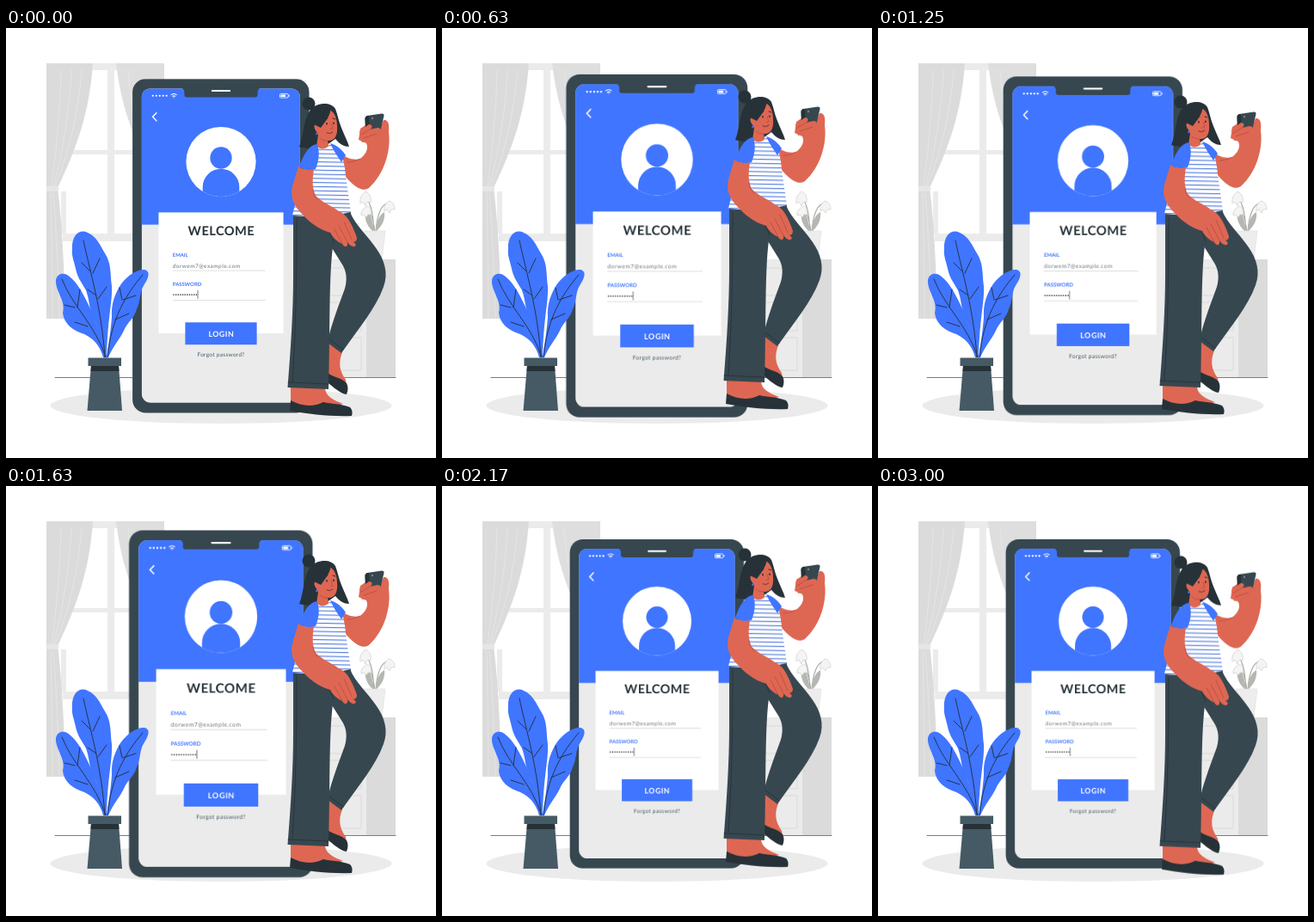
Animation, 500 px wide and 500 px high, one loop 3040 ms. Source, as an HTML page:

```html
<!DOCTYPE html>
<html lang="en">
<head>
<meta charset="utf-8">
<title>Login illustration</title>
<style>
html, body { margin: 0; width: 100%; height: 100%; overflow: hidden; background: #fff; }
svg { display: block; width: 100vw; height: 100vh; }
text { font-family: Lato, "Open Sans", sans-serif; text-rendering: geometricPrecision; }
.bold { font-weight: 700; }
.blue { fill: #4075ff; }
.dark { fill: #37474f; }
.ink { fill: #263238; }
.skin { fill: #de6753; }
.line { fill: none; stroke-linecap: round; stroke-linejoin: round; }
.vein { stroke: #24344c; stroke-width: 1; }
.crease { stroke: #b94d3f; stroke-width: .8; }
.seam { stroke: #222f36; stroke-width: .7; }

#phone { transform-origin: 250px 253px; animation: beat 3040ms linear infinite; }
#woman { animation: float 3040ms linear infinite; }

@keyframes beat {
  0%     { transform: scale(1.0145); }
  8.7%   { transform: scale(1.1); }
  29.6%  { transform: scale(1); }
  38.3%  { transform: scale(1); }
  48%    { transform: scale(1.1); }
  60.5%  { transform: scale(1); }
  98.68% { transform: scale(1); }
  100%   { transform: scale(1.0145); }
}
@keyframes float {
  0%    { transform: translateY(0); }
  23.5% { transform: translateY(-9px); }
  48.5% { transform: translateY(1px); }
  73.5% { transform: translateY(-9px); }
  98.2% { transform: translateY(1px); }
  100%  { transform: translateY(0); }
}
</style>
</head>
<body>
<svg viewBox="0 0 500 500">
  <defs>
    <clipPath id="screen"><rect x="159" y="73" width="181.5" height="360" rx="10"/></clipPath>
    <clipPath id="disc"><circle cx="250" cy="157" r="40"/></clipPath>
    <pattern id="stripes" width="80" height="4.8" y="142" patternUnits="userSpaceOnUse" patternTransform="rotate(1)">
      <rect width="80" height="4.8" fill="#fff"/>
      <rect y="2" width="80" height="1.1" fill="#4b76df"/>
    </pattern>
  </defs>

  <!-- window and curtains -->
  <g>
    <path fill="#ebebeb" d="M66 239H184V248H66Z M118 49H126V239H118Z M68 142H184V147H68Z M64 190H70V239H64Z M90 41H140V49H90Z"/>
    <path fill="#dedede" d="M128 41C132 76 140 104 152 132L176 187H184V41Z"/>
    <path fill="#dbdbdb" d="M47 41H101C97 98 83 138 60 186C65 224 68 280 69 338H47Z"/>
    <path class="line" stroke="#e8e8e8" stroke-width=".8" d="M88 49C84 100 73 145 57 185 M76 49C74 95 66 145 55 185 M64 49C63 100 58 145 53 185 M55 192C59 240 61 290 62 338 M52 192C53 240 54 290 54 338 M142 49C144 75 147 100 152 120"/>
    <rect x="47" y="184" width="14" height="6" rx="2" fill="#e6e6e6"/>
  </g>

  <!-- cabinet and flowers -->
  <g>
    <path fill="#ebebeb" d="M330 269H419V406H330Z"/>
    <path fill="#dbdbdb" d="M419 269H453V406H419Z"/>
    <path class="line" stroke="#dadada" d="M340 279H413V311H340Z M340 319H413V352H340Z M340 360H413V398H340Z"/>
    <path class="line" stroke="#a9ada6" stroke-width="1.2" d="M428 238C427 218 425 203 417 196 M430 238C431 219 436 203 446 204 M429 238C427 219 422 211 418 211"/>
    <path fill="#b5b8b2" d="M427 237C418 229 415 217 420 210C424 218 427 226 428 237Z M430 237C430 226 434 217 440 214C441 222 438 230 430 237Z"/>
    <path fill="#f4f4f4" stroke="#cfd1cc" stroke-width=".7" d="M418 190C413 194 411 198 412 204L415 202L418 207L420 202L424 203C425 197 423 192 418 190Z M445 201C441 204 439 208 440 213L443 211L446 215L448 211L452 211C452 206 450 202 445 201Z M420 207C415 210 412 214 413 218L416 217L419 220L421 217L424 217C425 212 424 208 420 207Z"/>
    <path fill="#ededed" stroke="#dcdcdc" stroke-width=".6" d="M416 236H441L437 269H421Z"/>
  </g>

  <path class="line" stroke="#4d6355" stroke-width=".8" d="M57 406.5H453"/>
  <ellipse cx="250" cy="439" rx="198.5" ry="21" fill="#ebebeb"/>

  <g id="phone">
    <rect class="dark" x="148.6" y="62" width="202.4" height="382.6" rx="15"/>
    <g clip-path="url(#screen)">
      <rect x="159" y="73" width="182" height="361" fill="#ebebeb"/>
      <rect class="blue" x="159" y="73" width="182" height="156"/>
    </g>
    <path class="dark" d="M203 72Q208 73 208 77V80Q208 83 211 83H289Q292 83 292 80V77Q292 73 297 72Z"/>
    <path class="line" stroke="#fff" stroke-width="2" d="M240 75.7H260"/>
    <path class="line" stroke="#fff" stroke-width="2.2" stroke-dasharray="0 3.9" d="M172 81.3H188"/>
    <path class="line" stroke="#fff" d="M193 80.2Q196 77.8 199 80.2 M194.5 82Q196 80.8 197.5 82 M196 83.3V83.4"/>
    <rect x="317.5" y="79" width="9.5" height="4.6" rx="1" fill="none" stroke="#fff" stroke-width=".8"/>
    <path fill="#fff" d="M318.5 80H324V82.6H318.5Z M327.4 80.3H328.4V82.3H327.4Z"/>
    <path class="line" stroke="#fff" stroke-width="1.4" d="M176 101L171.7 105.5L176 110"/>

    <circle cx="250" cy="157" r="40" fill="#fff"/>
    <g class="blue" clip-path="url(#disc)">
      <circle cx="250" cy="152.5" r="12.5"/>
      <path d="M229 197V186A21 21 0 0 1 271 186V197Z"/>
    </g>

    <rect x="178.5" y="215" width="143" height="138.5" fill="#fff"/>
    <text class="bold ink" x="250.4" y="240.8" font-size="14.4" letter-spacing=".45" text-anchor="middle">WELCOME</text>
    <text class="bold blue" x="194.6" y="266" font-size="5.8">EMAIL</text>
    <text x="194.6" y="278.3" font-size="6.4" letter-spacing=".45" fill="#6c767b">dorwem7@example.com</text>
    <text class="bold blue" x="194.6" y="299.5" font-size="5.9">PASSWORD</text>
    <path class="line" stroke="#37474f" stroke-width="1.6" stroke-dasharray="0 2.6" d="M195.8 309.3H222"/>
    <path class="line" stroke="#37474f" stroke-width=".7" d="M223.4 304.5V313.5"/>
    <path class="line" stroke="#d3d3d3" stroke-width=".7" d="M195 281.7H300.5 M195 315.6H300.5"/>
    <rect class="blue" x="209" y="341" width="82" height="25.5"/>
    <text class="bold" x="250.3" y="357.2" font-size="8.7" letter-spacing=".5" text-anchor="middle" fill="#fff">LOGIN</text>
    <text x="250" y="380.3" font-size="6.4" letter-spacing=".3" text-anchor="middle" fill="#455a64">Forgot password?</text>
  </g>

  <!-- plant -->
  <g>
    <path class="blue" d="M113 383C112 362 106 346 101 336C97 328 97 316 93 305C88 296 83 290 81 280C79 270 76 265 77 257C76 242 85 233 95 238C106 243 109 252 115 262C123 274 121 287 123 300C124 318 118 338 117 383Z"/>
    <path class="blue" d="M113 383C109 368 101 361 91 356C78 352 67 344 66 331C70 317 57 306 58 293C60 284 69 284 75 290C83 297 88 306 93 316C97 324 101 332 104 342C109 354 114 368 116 383Z"/>
    <path class="blue" d="M117 383C120 364 122 350 123 336C122 320 127 309 133 299C141 288 150 282 159 281C168 281 167 289 161 298C155 306 157 317 152 327C149 338 141 342 137 352C132 362 124 371 119 383Z"/>
    <path class="line vein" d="M90 247C98 285 111 325 115 383 M88 273L98 283 M95 304L105 311 M109 268L101 285 M117 301L107 315 M65 292C78 325 104 345 116 383 M68 322L80 325 M80 342L95 347 M86 304L83 325 M159 287C140 309 122 338 118 383 M151 311L136 316 M143 332L127 339 M132 302L135 316"/>
    <path fill="#455a64" d="M99 392H131L135 445H94.500Z M95.500 383.500H134V393H95.500Z"/>
    <path class="ink" d="M99 393H131L131.500 399H98.500Z"/>
  </g>

  <g id="woman">
    <!-- back foot and leg -->
    <path class="skin" d="M375 366L391 377C386 390 388 399 395 409L397 422L378 406L371 400Z"/>
    <path class="ink" d="M370 397C377 407 389 405 396 413C398 417 398 421 396 426C389 426 377 414 367 407Z"/>
    <path class="dark" d="M366 214H400C406 229 421 242 431 257C440 270 445 285 439 301C430 326 409 351 390 378L374 366C376 352 384 330 394 303C397 292 396 283 391 275L371 243Z"/>
    <path class="line seam" d="M376 362L392 374"/>

    <!-- front foot and leg -->
    <path class="skin" d="M331 416H371C370 427 379 432 392 437L370 443L331 437Z"/>
    <path class="ink" d="M331 433C344 440 357 441 369 435C377 437 391 437 400 441C403 444 403 448 402 451C378 452 353 449 330 445Z"/>
    <path class="dark" d="M334 217L401 214C400 228 388 238 381 249C375 280 377 360 375 420L327.500 418C331 374 334 330 334 288Z"/>
    <path class="line seam" d="M328 412L375 414 M381 249C376 235 370 229 363 224 M338 222C338 290 337 350 333 411"/>

    <!-- raised arm -->
    <path class="skin" d="M388 145C396 152 405 154 412 152C418 147 422 141 419 134L410 130L412 117L424 109L436 114L439 107C445 106 446 113 445 121C448 142 440 170 422 186C412 193 398 178 387 163Z"/>
    <path class="dark" d="M420 102L437 99.500Q440 99.500 439.500 102L436 117Q435 120 432 120L421 121Q418 121 418 118L417.500 105Q417.500 103 420 102Z"/>
    <path class="ink" d="M420 102L422 102L423 120L420 121Q418 121 418 118L417.500 105Q417.500 103 420 102Z"/>
    <circle cx="426" cy="105" r="1.200" fill="#7a878c"/>
    <path class="skin" d="M411 120L422 112C426 112 427 116 423 118L432 116C437 116 437 121 431 123C435 125 432 129 428 130L414 133Z"/>
    <path class="line crease" d="M413 124L423 118 M416 128L431 123 M397 156C402 156 407 155 412 152"/>

    <!-- hair and head -->
    <circle class="ink" cx="352" cy="88" r="7.500"/>
    <path class="ink" d="M354 95C361 87 377 85 383 94C386 102 387 109 390 116C393 124 397 131 399 138C393 138 388 135 383 129L362 144C355 139 348 140 341 138C347 123 345 108 354 95Z"/>
    <path class="skin" d="M360 119C356 113 361 108 365 113C368 106 371 101 375 95C383 97 385 107 385 114C386 125 382 132 374 131L376 140C371 147 363 142 361 138L363 124Z"/>
    <path class="ink" d="M359 101L378 92C377 103 371 109 366 116L358 112Z"/>
    <path class="line" stroke="#263238" d="M370 107L374 105 M380 105L383 106"/>
    <path class="line" stroke="#263238" stroke-width="1.800" d="M373 111V111.500 M381 110.500V111"/>
    <path class="line crease" d="M378 111L380 117L377 117.500 M365 128C369 131 371 131 374 131"/>
    <path class="line" stroke="#7c302d" d="M373 122Q377 124 380 121"/>
    <circle cx="361.500" cy="123" r="1.300" fill="#4075ff"/>

    <!-- shirt -->
    <path fill="url(#stripes)" d="M360 136C366 143 373 141 377 135L390 143L394 163C396 182 399 199 401 214Q369 222 333 218C339 194 345 177 349 146Z"/>
    <path class="blue" d="M362 135C352 136 346 147 341 161C346 166 354 166 360 164C364 154 365 145 362 135Z M377 134C385 136 391 142 395 148L390 156C386 150 381 143 377 134Z"/>

    <!-- resting arm -->
    <path class="skin" d="M340 161C345 165 353 166 358 164C356 177 356 187 360 195C368 203 379 207 387 213C397 217 403 229 408 244C408 249 404 250 402 246L407 252C405 257 400 253 397 249C398 255 394 256 391 251C386 249 380 244 377 238C370 236 356 230 345 217C334 207 330 196 333 184Z"/>
    <path class="line crease" d="M393 225L402 246 M387 230L397 249 M382 234L391 251 M357 188C358 193 359 197 363 200"/>
  </g>
</svg>
</body>
</html>
```
